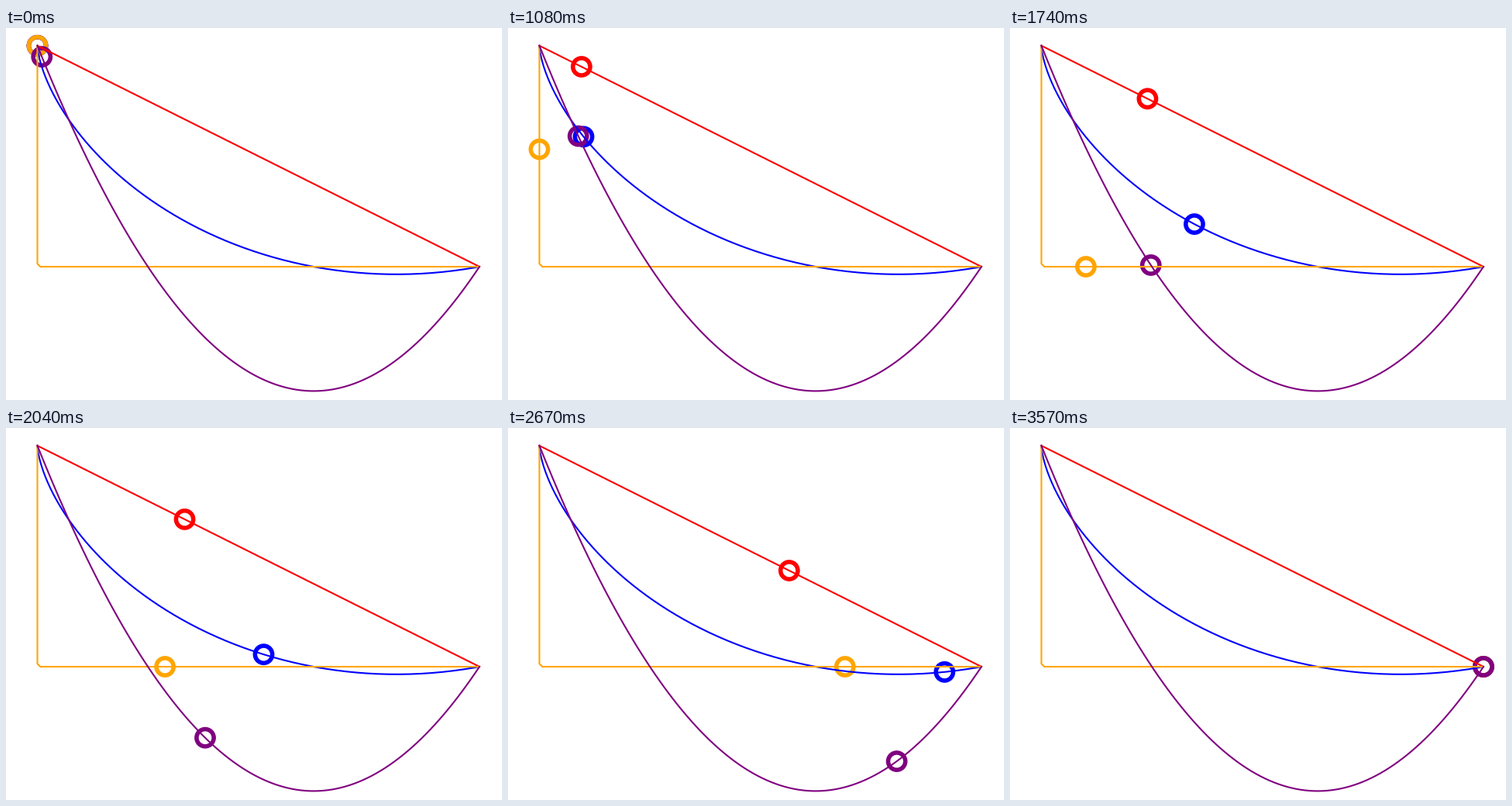
Animation of 640x480 px, one loop 4500 ms. Source, as a matplotlib script:

```python
import numpy as np
import matplotlib.pyplot as plt
from matplotlib.animation import FuncAnimation

W, H, DPI = 640, 480, 100
SCALE = 285.2            # pixels per unit
X0, Y0 = 40.5, 22.8      # start point in pixels from the top left
STEPS = 149              # equal time steps along each track
FRAMES = 150

s = np.linspace(0, 1, STEPS + 1)


def straight():
    return 2 * s**2, -s**2


def cycloid():
    angle, radius = 3.50837 * s, 0.5172
    return radius * (angle - np.sin(angle)), -radius * (1 - np.cos(angle))


def drop_and_slide():
    """Free fall down the wall, then constant speed along the floor."""
    return np.maximum(0, 4 * s - 2), -np.minimum(1, 2 * s)**2


def parabola(x):
    return x**2 - 2.5 * x


def parabola_motion():
    """Integrate ds / v with x = u^2, which removes the singular start."""
    u = np.linspace(0, np.sqrt(2), 4001)
    rate = np.sqrt(1 + (2 * u**2 - 2.5)**2) / np.sqrt(2.5 - u**2)
    time = np.concatenate(([0], np.cumsum((rate[1:] + rate[:-1]) / 2)))
    x = np.interp(s * time[-1], time, u)**2
    x = np.maximum(x, 2 / 99)
    return x, parabola(x)


fig = plt.figure(figsize=(W / DPI, H / DPI), dpi=DPI, facecolor="white")
ax = fig.add_axes([0, 0, 1, 1])
ax.set_xlim(-X0 / SCALE, (W - X0) / SCALE)
ax.set_ylim((Y0 - H) / SCALE, Y0 / SCALE)
ax.axis("off")

# colour, motion, travel time in frames
tracks = [
    ("red", straight(), 119),
    ("blue", cycloid(), 94),
    ("orange", drop_and_slide(), 106),
    ("purple", parabola_motion(), 103),
]

rings = []
for color, (x, y), _ in tracks:
    if color == "purple":
        x = np.linspace(0, 2, 100)
        y = parabola(x)
    ax.plot(x, y, color=color, lw=1.5, zorder=2)
    rings.append(ax.scatter([0], [0], s=16**2, facecolors="none",
                            edgecolors=color, linewidths=4, zorder=1))


def update(frame):
    for ring, (_, (x, y), duration) in zip(rings, tracks):
        k = min(STEPS, -(-STEPS * frame // duration))
        ring.set_offsets([[x[k], y[k]]])
    return rings


anim = FuncAnimation(fig, update, frames=FRAMES, interval=30,
                     repeat=True, repeat_delay=0)
plt.show()
```
